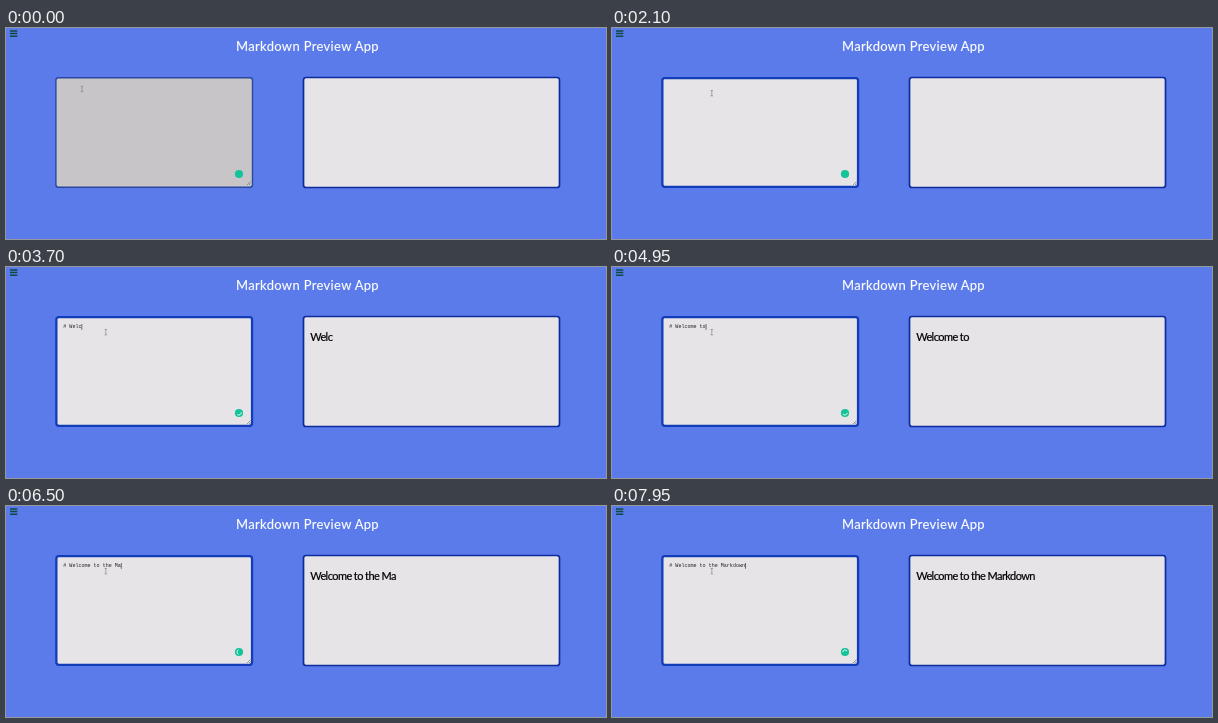
These frames come from a looping animation (600x211 px, 8000 ms). An HTML page:

```html
<!DOCTYPE html>
<html lang="en">
<head>
<meta charset="utf-8">
<title>Markdown Preview App</title>
<style>
  html, body { margin: 0; width: 100%; height: 100%; overflow: hidden; background: #5b7bea; }
  svg { display: block; width: 600px; height: 211px; }
  text { white-space: pre; }
  .title { font: 13px Lato, sans-serif; letter-spacing: .33px; fill: #fff; stroke: #fff; stroke-width: .15px; }
  .heading { font: 11px Lato, sans-serif; letter-spacing: -.57px; fill: #000; stroke: #000; stroke-width: .2px; }
  .source { font: 5.06px "Liberation Mono", monospace; fill: #222; }
</style>
</head>
<body>
<svg viewBox="0 0 600 211">
  <rect width="600" height="211" fill="#5b7bea"/>
  <path d="M4 3H11.3M4 5.6H11.3M4 8.2H11.3" stroke="#0c4a42" stroke-width="1.5"/>
  <text class="title" x="230" y="23">Markdown Preview App</text>

  <rect id="editor" rx="2.5"/>
  <path d="M241 157L244.5 153.5M243 157L244.5 155.5" stroke="#777" stroke-width=".7"/>
  <circle cx="233" cy="146" r="4.1" fill="#15c39a"/>
  <path id="spinner" d="M230.8 146.4A2.3 2.3 0 0 0 235.2 146.4" fill="none" stroke="#fff" stroke-width=".8"/>
  <text id="source" class="source" x="57.3" y="61.4"></text>
  <path id="caret" d="M0 57V62.8" stroke="#333" stroke-width=".7"/>
  <path id="pointer" d="M-1.2 -2.7H1.2M0 -2.7V2.7M-1.2 2.7H1.2" fill="none" stroke="#777" stroke-width=".6"/>

  <rect x="297.5" y="49.5" width="256" height="110" rx="2.5" fill="#e6e4e7" stroke="#0d2b9c" stroke-width="1.7"/>
  <text id="heading" class="heading" x="304.2" y="73.6"></text>
</svg>
<script>
const LOOP = 8000;
const TEXT = "# Welcome to the Markdown";
// When each character of TEXT is typed, in ms.
const KEYS = [2300, 2500, 2900, 3200, 3400, 3650, 4050, 4200, 4400, 4550, 4750, 4900, 5200,
              5500, 5750, 5900, 6050, 6250, 6450, 6650, 6850, 7050, 7350, 7500, 7700];
const CHAR_WIDTH = 5.06 * 0.6;

const el = id => document.getElementById(id);
const [editor, spinner, source, caret, pointer, heading] =
  ["editor", "spinner", "source", "caret", "pointer", "heading"].map(el);

const progress = (t, from, to) => {
  const p = Math.min(1, Math.max(0, (t - from) / (to - from)));
  return p * p * (3 - 2 * p);
};
const mix = (a, b, p) => a + (b - a) * p;
const mixColor = (a, b, p) => `rgb(${a.map((v, i) => Math.round(mix(v, b[i], p)))})`;
const set = (node, attributes) => {
  for (const name in attributes) node.setAttribute(name, attributes[name]);
};

function draw(t) {
  const focus = progress(t, 150, 400);
  const border = mix(1.4, 2.3, focus);
  set(editor, {
    x: 49.2 + border / 2, y: 49 + border / 2,
    width: 198 - border, height: 111 - border,
    fill: mixColor([199, 197, 200], [230, 228, 231], focus),
    stroke: mixColor([43, 72, 158], [18, 60, 184], focus),
    "stroke-width": border
  });

  const count = KEYS.filter(key => key <= t).length;
  source.textContent = TEXT.slice(0, count);
  heading.textContent = TEXT.slice(2, Math.max(2, count));

  const caretOn = count > 0 || (t >= 300 && t < 1050) || (t >= 1600 && t < 2100);
  set(caret, {
    transform: `translate(${57.6 + count * CHAR_WIDTH} 0)`,
    opacity: caretOn ? (count ? 1 : 0.6) : 0
  });

  const move = progress(t, 650, 1050);
  const x = mix(mix(76, 74.2, progress(t, 50, 450)), 99.8, move);
  set(pointer, { transform: `translate(${x} ${mix(61, 65.2, move)})` });

  set(spinner, {
    transform: `rotate(${(t - 3800) / 1200 * 360} 233 146)`,
    opacity: count ? 1 : 0
  });
}

function frame(now) {
  draw(now % LOOP);
  requestAnimationFrame(frame);
}
draw(0);
requestAnimationFrame(frame);
</script>
</body>
</html>
```
